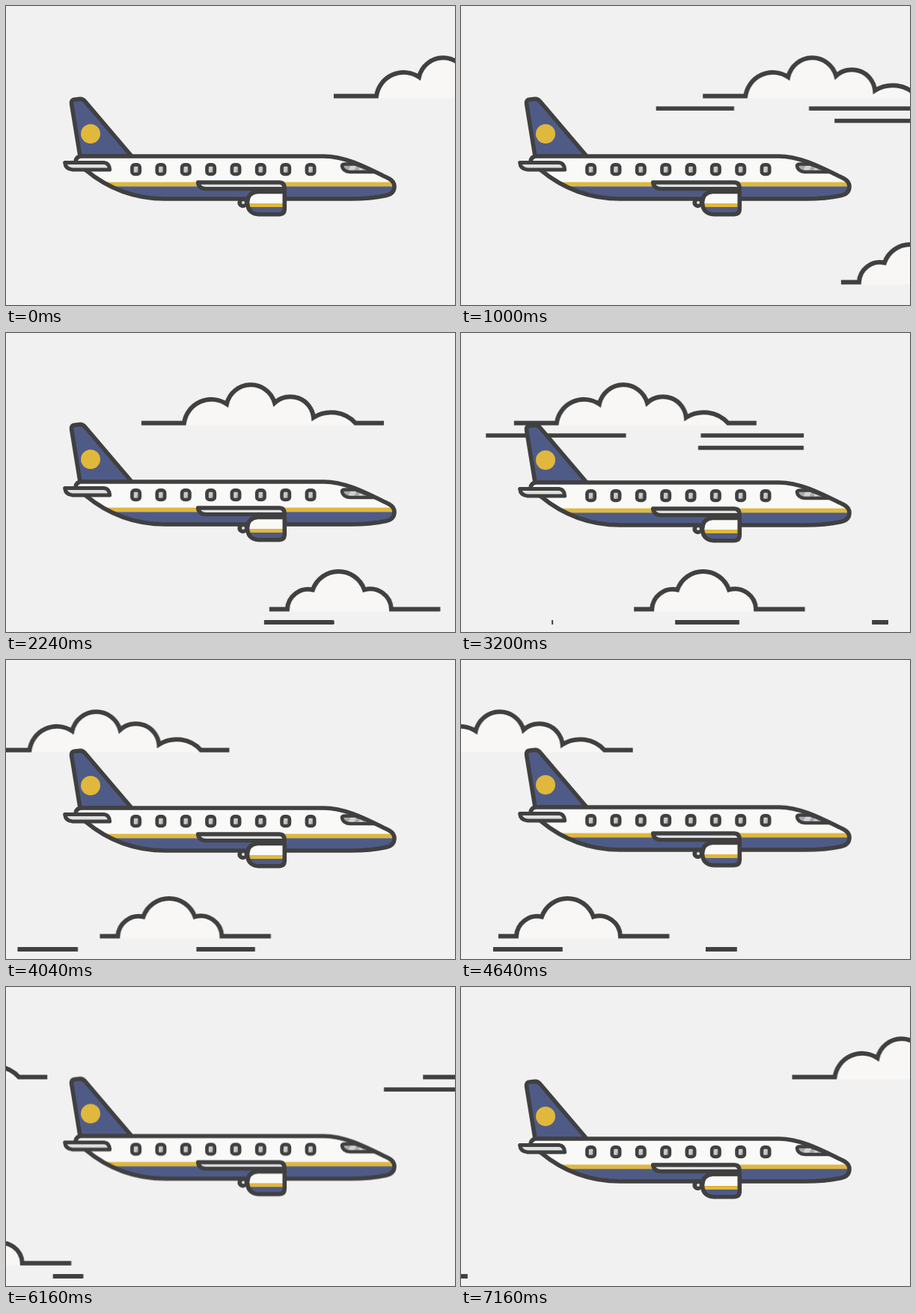
An HTML page that plays this animation: 600x400 px, repeating every 7.2 s.

```html
<!DOCTYPE html>
<html lang="en">
<head>
<meta charset="utf-8">
<title>Plane in flight</title>
<style>
  html, body { margin: 0; width: 100%; height: 100%; overflow: hidden; background: #f1f1f1; }
  #stage { display: block; width: 600px; height: 400px; }

  .ink { fill: none; stroke: #404041; stroke-width: 6; }
  .puff { fill: #f8f7f6; }
  .streak { fill: #404041; }
  .hull { fill: #f9f9f7; }
  .navy { fill: #4f5b87; }
  .gold { fill: #e0b83c; }
  .metal { fill: #dfe1e1; }
  .edge { stroke: #404041; stroke-width: 5.6; stroke-linejoin: round; }

  .sky-high { animation: drift-high 7200ms linear infinite; }
  .sky-low { animation: drift-low 7200ms linear infinite; }
  @keyframes drift-high { from { transform: translateX(438px); } to { transform: translateX(-388px); } }
  @keyframes drift-low { from { transform: translateX(633.8px); } to { transform: translateX(-272px); } }

  /* Streaks run inside a window that travels with their cloud. */
  .dash-fast { animation: dash-fast 2400ms linear infinite; }
  .dash-slow { animation: dash-slow 2400ms linear infinite; }
  @keyframes dash-fast { from { transform: translateX(457px); } to { transform: translateX(-837px); } }
  @keyframes dash-slow { from { transform: translateX(431.5px); } to { transform: translateX(-408.5px); } }

  /* --s: entry time in ms, --lag: delay of the tail behind the head */
  .gust { transform-origin: 0 0; animation: gust 7200ms linear infinite; }
  @keyframes gust {
    from {
      transform: translateX(calc(450px + var(--s) * 0.2256px))
                 scaleX(calc(var(--lag) * 0.2025 - var(--s) * 0.0231));
    }
    to {
      transform: translateX(calc(450px - (7200 - var(--s)) * 0.2256px))
                 scaleX(calc(var(--lag) * 0.2025 + (7200 - var(--s)) * 0.0231));
    }
  }

  .plane { animation: bob 7200ms ease-in-out infinite; }
  @keyframes bob {
    0%, 13.89% { transform: translateY(0); }
    31.11% { transform: translateY(-2px); }
    44.44% { transform: translateY(-1px); }
    56.11% { transform: translateY(-3px); }
    72.22% { transform: translateY(-5px); }
    99.44%, 100% { transform: translateY(2px); }
  }
</style>
</head>
<body>
<svg id="stage" viewBox="0 0 600 400">
  <defs>
    <path id="body" d="M101 201 H425 C455 201 485 218 512 231 Q519 235 519 241.5 Q519 251 508 253.5 Q487 258 460 258 H213 C172 258 136 244 106 219 L93 208 Q94 201 101 201 Z"/>
    <path id="engine" d="M336 248.5 H372.3 V271 Q372.3 278.7 364.5 278.7 H338 Q323 278 322.5 263 Q323 249.5 336 248.5 Z"/>
    <path id="cockpit" d="M453 211.5 H467 Q480 216 493 222 H460 Q450 221.5 449 214 Q449 211.5 453 211.5 Z"/>
    <clipPath id="body-clip"><use href="#body"/></clipPath>
    <clipPath id="engine-clip"><use href="#engine"/></clipPath>
    <clipPath id="cockpit-clip"><use href="#cockpit"/></clipPath>
  </defs>

  <g class="sky-high">
    <g id="high">
      <path class="puff" d="M57 123.5 V120.5 A37 37 0 0 1 114 95 A33 33 0 0 1 178 93.5 A31 31 0 0 1 230 113 A44 44 0 0 1 286 120.5 V123.5 Z"/>
      <path class="ink" d="M0 120.5 H57 A37 37 0 0 1 114 95 A33 33 0 0 1 178 93.5 A31 31 0 0 1 230 113 A44 44 0 0 1 286 120.5 H324"/>
      <svg x="-62.5" y="130" width="450" height="14">
        <g class="streak dash-fast">
          <rect y="4.3" width="187" height="5.6"/>
          <rect x="287" y="4.3" width="187" height="5.6"/>
        </g>
      </svg>
      <svg x="95" y="146" width="292.5" height="14">
        <rect class="streak dash-slow" y="4.8" width="141" height="5.6"/>
      </svg>
    </g>
  </g>

  <g class="sky-low">
    <path class="puff" d="M24 372.5 V369.5 A28 28 0 0 1 58 343.5 A36.5 36.5 0 0 1 127 343.5 A28 28 0 0 1 163 369.5 V372.5 Z"/>
    <path class="ink" d="M0 369.5 H24 A28 28 0 0 1 58 343.5 A36.5 36.5 0 0 1 127 343.5 A28 28 0 0 1 163 369.5 H228.5"/>
    <svg id="gusts" x="-110" y="380" width="450" height="14"></svg>
  </g>

  <g class="plane">
    <path class="navy edge" d="M99 201 L87.6 131 Q86.8 125.4 92 125 L99 124.4 Q103 124.2 106 128 L168 201 Z"/>
    <circle class="gold" cx="113" cy="171" r="13"/>

    <use href="#body" class="hull"/>
    <g clip-path="url(#body-clip)">
      <rect class="gold" x="90" y="235.6" width="440" height="6"/>
      <rect class="navy" x="90" y="241.4" width="440" height="20"/>
    </g>
    <use href="#body" class="ink edge"/>

    <g id="windows"></g>

    <use href="#cockpit" fill="#a6a9aa"/>
    <path clip-path="url(#cockpit-clip)" fill="#d0d2d2" d="M463 209 H471 L463 224 H455 Z M475 209 H479 L475 224 H470 Z"/>
    <use href="#cockpit" class="ink" style="stroke-width:4.6;stroke-linejoin:round"/>

    <path class="metal edge" style="stroke-width:5" d="M78.6 209.6 H131 Q138 210 138.6 219 H89 Q79.5 218.5 78.6 209.6 Z"/>

    <circle cx="316.5" cy="263" r="7.2" fill="#404041"/>
    <circle cx="317" cy="263" r="2" fill="#dfe1e1"/>
    <use href="#engine" class="hull"/>
    <g clip-path="url(#engine-clip)">
      <rect class="gold" x="320" y="264" width="56" height="5.4"/>
      <rect class="navy" x="320" y="269" width="56" height="12"/>
    </g>
    <use href="#engine" class="ink edge"/>
    <path class="metal edge" style="stroke-width:5.4" d="M256.6 236 H365 Q372.3 236 372.3 244.6 H267 Q257.5 244.3 256.6 236 Z"/>
  </g>
</svg>

<script>
  const byId = id => document.getElementById(id);

  function add(parent, tag, attrs) {
    const el = document.createElementNS("http://www.w3.org/2000/svg", tag);
    for (const key in attrs) el.setAttribute(key, attrs[key]);
    return parent.appendChild(el);
  }

  // Cabin windows, evenly spaced, each with a diagonal gleam.
  for (let i = 0; i < 8; i++) {
    const x = 173.6 + i * 33.35;
    const box = { x: x - 5.2, y: 212.4, width: 10.4, height: 12.6, rx: 3.6 };
    add(byId("windows"), "rect", { ...box, fill: "#a9acad" });
    add(byId("windows"), "path", { d: `M${x - 2} 214 h5 l-3 9 h-3 Z`, fill: "#c9cbcb" });
    add(byId("windows"), "rect", { ...box, class: "ink", style: "stroke-width:4.6" });
  }

  // Entry time and tail lag of each low streak.
  const gusts = [[705, 283], [1937, 280], [3105, 281], [4360, 176], [5560, 130], [6754, 90]];
  for (const [s, lag] of gusts) {
    add(byId("gusts"), "rect", {
      class: "streak gust", y: 4.3, width: 1, height: 5.6, style: `--s:${s};--lag:${lag}`
    });
  }

  // A second high cloud follows one full loop behind the first.
  const next = byId("high").cloneNode(true);
  next.removeAttribute("id");
  next.setAttribute("transform", "translate(826 0)");
  byId("high").after(next);
</script>
</body>
</html>
```
